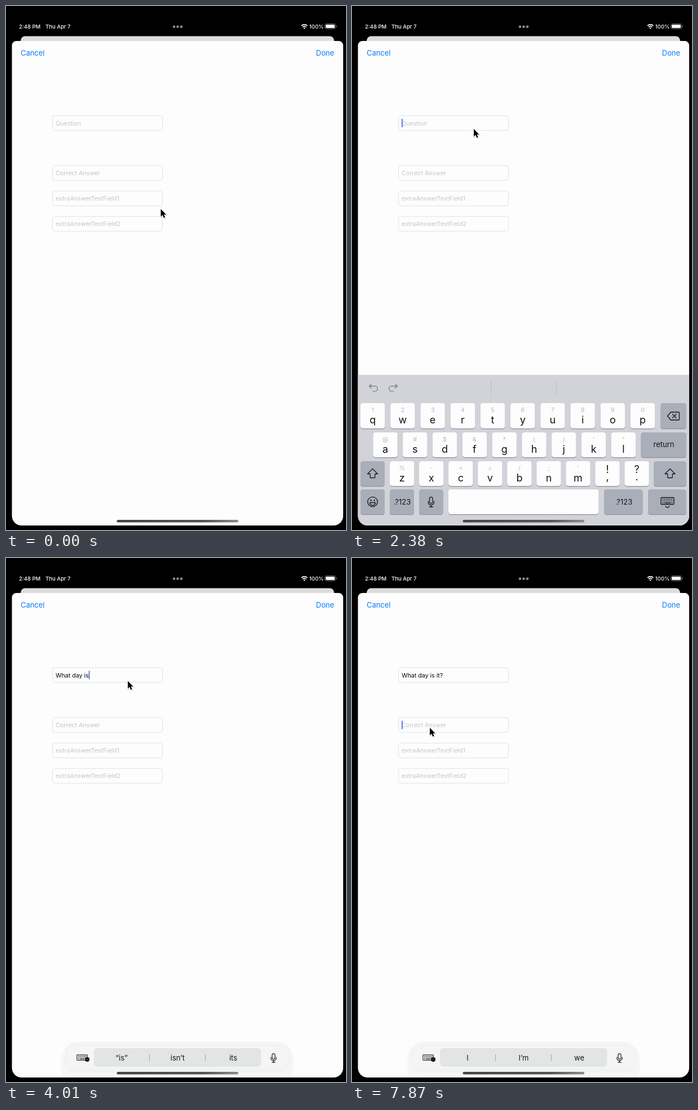
These frames come from a looping animation (603x929 px, 8000 ms). An HTML page:

```html
<!DOCTYPE html>
<html lang="en">
<head>
<meta charset="utf-8">
<title>Question form</title>
<style>
  html, body { margin: 0; width: 100%; height: 100%; overflow: hidden; background: #000; }
  svg { display: block; width: 603px; height: 929px; }
  text { font-family: Inter, Roboto, sans-serif; white-space: pre; }
  .mid { text-anchor: middle; }
  .status { font-size: 9.5px; font-weight: 500; fill: #fff; }
  .nav { font-size: 12.9px; fill: #067cf9; }
  .box { fill: #fdfdfd; stroke: #e2e2e3; }
  .entry { font-size: 10.65px; fill: #050505; }
  .hint { fill: #c5c5c7; }
  .letter { font-size: 18px; fill: #111; }
  .mark { font-size: 11px; fill: #b9b9bc; }
  .word { font-size: 13px; fill: #161616; }
  .line { fill: none; stroke: #151515; stroke-width: 1.3; stroke-linecap: round; stroke-linejoin: round; }
  .tool { stroke: #74767b; }
</style>
</head>
<body>
<svg id="stage" viewBox="0 0 603 929"></svg>
<script>
const SHEET = 'M10.5 70a8 8 0 0 1 8-8H590a8 8 0 0 1 8 8V904a17 17 0 0 1-17 17H27.5a17 17 0 0 1-17-17Z';
const FIELDS = [[194, 'Question'], [282.5, 'Correct Answer'], [327.7, 'extraAnswerTextField1'], [372.7, 'extraAnswerTextField2']];

const rect = (x, y, w, h, r, fill) => `<rect x="${x}" y="${y}" width="${w}" height="${h}" rx="${r}" fill="${fill}"/>`;
const text = (x, y, cls, str, extra = '') => `<text x="${x}" y="${y}" class="${cls}" ${extra}>${str}</text>`;
const path = (d, cls = 'line') => `<path class="${cls}" d="${d}"/>`;
const at = (x, y, body, scale = '1') => `<g transform="translate(${x} ${y}) scale(${scale})">${body}</g>`;

const undo = path('M-4-7.5-8-3.5-4 .5M-8-3.5H3a5 5 0 0 1 0 10H-1', 'line tool');
const mic = path('M-2.8-5.5a2.8 2.8 0 0 1 5.6 0V0a2.8 2.8 0 0 1-5.6 0ZM-5.2-1V.5a5.2 5.2 0 0 0 10.4 0V-1M0 5.8V9M-3 9H3');
const shift = path('M0-8.5 9 .5H4.3V6.5a1 1 0 0 1-1 1H-3.3a1 1 0 0 1-1-1V.5H-9Z');
const keyboardIcon = path('M-10.5-6.5h21a1 1 0 0 1 1 1v10a1 1 0 0 1-1 1h-21a1 1 0 0 1-1-1v-10a1 1 0 0 1 1-1Z') +
  '<path d="M-9-3.5H10M-9-.5H10" stroke="#151515" stroke-width="1.7" stroke-dasharray="1.7 1.3"/>' +
  '<path d="M-9 2.7h2M-5.5 2.7h11M7 2.7h2" stroke="#151515" stroke-width="1.5"/>';

function key(x, y, w, dark, body = '') {
  const h = y < 710 ? 45 : 44;
  return rect(x, y + 1.2, w, h, 4.5, '#8e9096') + rect(x, y, w, h, 4.5, dark ? '#a9aeb9' : '#fdfdfd') + body;
}

function keyRow(x0, y, pitch, letters, marks) {
  return [...letters].map((ch, i) => {
    const x = x0 + i * pitch, c = x + 21.7;
    const punct = ',.'.includes(ch);
    const top = marks[i].replace('&', '&amp;');
    return key(x, y, 43.4, false, punct
      ? text(c, y + 21, 'mid letter', top, 'font-size="16"') + text(c, y + 34, 'mid letter', ch)
      : text(c, y + 15.5, 'mid mark', top) + text(c, y + 36, 'mid letter', ch));
  }).join('');
}

function keyboard() {
  const label = (x, y, str) => text(x, y, 'mid word', str);
  return rect(10, 654, 589, 280, 0, '#d1d3d9') +
    at(38, 677, undo, '.92') + at(73, 677, undo, '-.92 .92') +
    rect(246, 662, 1, 28, 0, '#bcbec4') + rect(362, 662, 1, 28, 0, '#bcbec4') +
    `<g id="paste">${rect(105, 663, 12.5, 15, 2, '#000')}${rect(109, 664, 5, 2, 1, '#d1d3d9')}` +
    '<path d="M102.5 668h7l3.5 3.5v9.5a1.5 1.5 0 0 1-1.5 1.5h-9a1.5 1.5 0 0 1-1.5-1.5v-11.500a1.500 1.500 0 0 1 1.500-1.500Z" fill="#d1d3d9" stroke="#000" stroke-width="1.4"/></g>' +
    keyRow(15, 704, 53.2, 'qwertyuiop', '1234567890') +
    key(547, 704, 46, true, at(570, 727, path('M-10.500 0-4.500-7H8.500a2 2 0 0 1 2 2V5a2 2 0 0 1-2 2H-4.500ZM-1.500-3.300 5 3.300M5-3.300-1.500 3.300'))) +
    keyRow(37.3, 756, 52.8, 'asdfghjkl', "@#$&*()'\"") +
    key(512.5, 756, 80.5, true, label(553, 782, 'return')) +
    key(15, 807, 43, true, at(36.5, 829, shift)) +
    keyRow(67, 807, 52.05, 'zxcvbnm,.', "%-+=/;'!?") +
    key(535, 807, 58, true, at(564, 829, shift)) +
    key(15, 857, 43, true, at(36.5, 879, '<circle class="line" r="8.700"/>' +
      path('M-5 1.500H5a5 5 0 0 1-10 0Z') + '<circle cx="-3" cy="-2.500" r="1.200"/><circle cx="3" cy="-2.500" r="1.200"/>')) +
    key(67, 857, 43, true, label(89, 884, '.?123')) +
    key(119, 857, 42.5, true, at(140.3, 879, mic)) +
    key(171, 857, 266.5, false) +
    key(447, 857, 68.5, true, label(482, 884, '.?123')) +
    key(525, 857, 68, true, at(559.5, 878, keyboardIcon) + path('M556 887l3.500 2.500 3.500-2.500'));
}

const dockedBar = rect(10, 911, 589, 40, 0, '#d1d3d9') + at(37.500, 924.500, keyboardIcon, '.9') +
  path('M69 918l-5 4.500') + path('M107 918l5 4.500', 'line tool') + text(206, 930, 'mid word', '“W”');

const pill = rect(98, 857, 412, 80, 31, '#f6f6f6') +
  rect(104, 862, 400, 50, 20, '#f1f2f2') + rect(109, 866, 391, 39, 8, '#f5f5f5') +
  rect(156, 869, 296.500, 33, 6, '#e3e5e5') +
  rect(254, 880, 1, 11.500, 0, '#a4a5a6') + rect(353, 880, 1, 11.500, 0, '#a4a5a6') +
  at(135, 886, keyboardIcon, '.8') + '<circle cx="144" cy="889" r="4.100" fill="#161616"/>' +
  '<path d="M141.700 889h5" stroke="#777" stroke-dasharray="1 .9"/>' + at(474.500, 886, mic, '.9') +
  [205, 304.500, 403].map(x => text(x, 890.500, 'mid word pred', '')).join('');

document.getElementById('stage').innerHTML = `
  <defs>
    <clipPath id="sheetClip"><path d="${SHEET}"/></clipPath>
    <linearGradient id="homeFill" x2="1" y2=".06">
      <stop stop-color="#444"/><stop offset=".75" stop-color="#555"/><stop offset="1" stop-color="#888"/>
    </linearGradient>
  </defs>
  <rect width="603" height="929"/>
  ${text(23, 39.500, 'status', '2:48 PM')}${text(70, 39.500, 'status', 'Thu Apr 7')}
  ${[298, 304.500, 311].map(x => `<circle cx="${x}" cy="36.800" r="2.300" fill="#8d8d8d"/>`).join('')}
  <g fill="none" stroke="#fff" stroke-width="1.700">
    <path d="M524 35a7.300 7.300 0 0 1 10.400 0M526 37.300a4.400 4.400 0 0 1 6.400 0"/>
    <path d="M529.200 41l-1.700-1.800a2.300 2.300 0 0 1 3.400 0Z" fill="#fff" stroke="none"/>
  </g>
  ${text(563.500, 39.500, 'status', '100%', 'text-anchor="end"')}
  <rect x="565.500" y="31.500" width="19" height="9" rx="2.800" fill="none" stroke="#777"/>
  ${rect(567, 33, 16, 6, 1.500, '#fff')}${rect(585.500, 34.500, 1.200, 3, .6, '#777')}
  ${rect(26, 53.500, 556, 20, 8, '#dcdcdc')}
  <path d="${SHEET}" fill="#fdfdfd"/>
  ${text(26, 88.200, 'nav', 'Cancel')}${text(582, 88.200, 'nav', 'Done', 'text-anchor="end"')}
  ${FIELDS.map(([y, label], i) => `<rect class="box" x="82.500" y="${y + .5}" width="195" height="26" rx="4"/>` +
    text(88, y + 17.500, 'entry hint', label, i ? '' : 'id="placeholder"')).join('')}
  ${text(88, 211.500, 'entry', '', 'id="typed"')}
  <rect id="caret" width="1.700" height="15" rx=".6" fill="#4668ee"/>
  <g clip-path="url(#sheetClip)">
    <g id="keys">${keyboard()}</g>
    <g id="docked">${dockedBar}</g>
    <g id="pill">${pill}</g>
  </g>
  <rect id="home" x="196.500" y="911" width="215.500" height="4.500" rx="2.200"/>
  <g id="pointer">
    <path d="M0 0V13.500L3.100 10.600 5.200 15.500 7.600 14.500 5.500 9.700H9.500Z" transform="translate(.8 1.300)" fill="#000" opacity=".18" stroke="#000" stroke-width="1.500"/>
    <path d="M0 0V13.500L3.100 10.600 5.200 15.500 7.600 14.500 5.500 9.700H9.500Z" stroke="#fff" stroke-width="1.600" paint-order="stroke"/>
  </g>`;

// Each entry changes part of the state from its time (ms) on.
const type = (str, words) => ({ str, caret: 1, ...(words && { words: words.split(' ') }) });
const move = (x, y) => ({ x, y });
const START = { x: 274.5, y: 360, str: '', caret: 0, field: 0, panel: '', drop: 0, words: ['', '', ''] };
const STEPS = [
  [150, move(262, 344)], [300, move(214, 286)], [450, move(158, 219)], [600, move(131, 200)], [750, move(136, 206)],
  [1050, { panel: 'keys', drop: 118, caret: 1 }],
  [1200, { ...move(184, 212), drop: 18 }],
  [1350, { ...move(216, 218), drop: 0 }],
  [1940, { caret: 0 }], [2240, { caret: 1 }],
  [2390, { ...type('W'), drop: 24 }],
  [2540, { ...type('Wh'), drop: 170 }],
  [2680, { ...type('Wha'), panel: 'docked' }],
  [2830, { ...type('What', '“What” What’s Whatever'), panel: 'pill' }],
  [2980, type('What ', 'is the are')],
  [3130, type('What d', '“d” do did')],
  [3280, type('What da', '“da” day days')],
  [3430, type('What day', '“day” days daily')],
  [3580, type('What day ', 'is of was')],
  [4010, type('What day is', '“is” isn’t its')],
  [4160, type('What day is ', 'it this the')],
  [4460, type('What day is it', '“it” its it’s')],
  [5060, { caret: .25 }],
  [5210, type('What day is it?', 'I I’m we')],
  [5660, { caret: 0 }], [6100, { caret: 1 }], [6400, { caret: 0 }], [6840, { caret: 1 }],
  [7280, move(208, 229)], [7430, move(180, 262)], [7580, move(150, 291)], [7720, move(138, 301)],
  [7870, { field: 1, caret: 1 }]
];

const el = id => document.getElementById(id);
const preds = document.querySelectorAll('.pred');

function draw(t) {
  const s = Object.assign({}, START, ...STEPS.filter(([from]) => from <= t).map(step => step[1]));
  el('typed').textContent = s.str;
  el('placeholder').style.display = s.str ? 'none' : '';
  const width = s.field || !s.str ? 0 : el('typed').getComputedTextLength();
  el('caret').setAttribute('x', 88 + width);
  el('caret').setAttribute('y', FIELDS[s.field][0] + 6);
  el('caret').style.opacity = s.caret;
  for (const id of ['keys', 'docked', 'pill']) el(id).style.display = s.panel === id ? '' : 'none';
  el('keys').setAttribute('transform', `translate(0 ${s.drop})`);
  el('paste').style.display = s.drop > 100 && !s.str ? '' : 'none';
  preds.forEach((node, i) => node.textContent = s.words[i]);
  el('home').setAttribute('fill', s.panel === 'docked' ? '#000' : 'url(#homeFill)');
  el('pointer').setAttribute('transform', `translate(${s.x} ${s.y})`);
}

const begin = performance.now();
function tick() {
  draw((performance.now() - begin) % 8000);
  requestAnimationFrame(tick);
}
tick();
</script>
</body>
</html>
```
